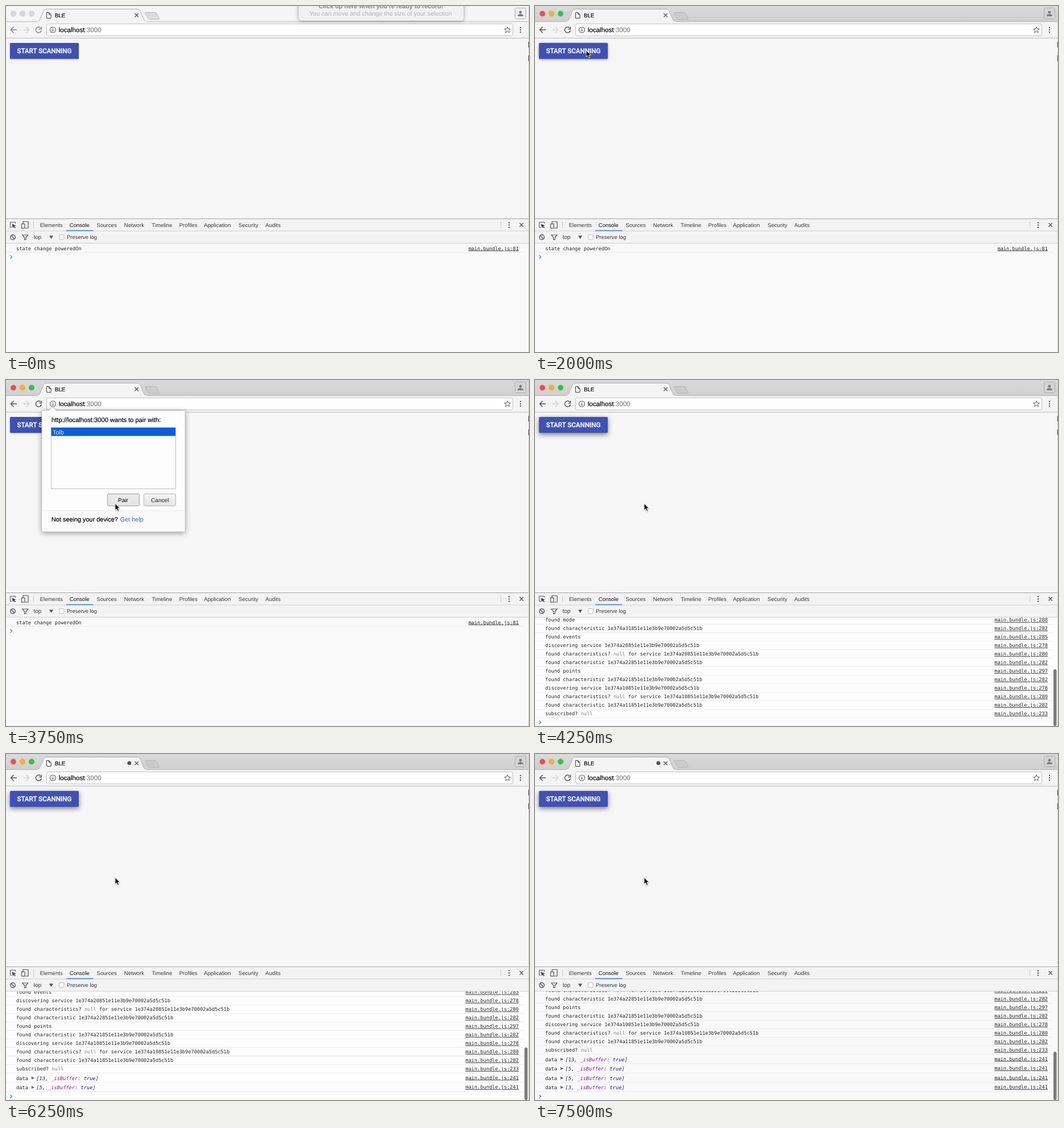
These frames come from a looping animation (920x609 px, 8 s). An HTML page:

```html
<!DOCTYPE html>
<html lang="en">
<head>
<meta charset="utf-8">
<title>BLE</title>
<style>
html, body { margin: 0; width: 100%; height: 100%; overflow: hidden; background: #f6f6f6; }
svg { display: block; width: 920px; height: 609px; }
text { font-family: "Liberation Sans", Arial, sans-serif; text-rendering: geometricPrecision; white-space: pre; }
.mono text { font-family: "DejaVu Sans Mono", monospace; font-size: 8.666px; fill: #262626; }
.line { fill: none; stroke: #5a5a5a; stroke-width: 1.4; }
.dark { stroke: #000; stroke-width: .2; }
.label { font-family: Roboto, sans-serif; font-weight: 500; stroke: #fff; stroke-width: .3; }
</style>
</head>
<body>
<svg id="stage" viewBox="0 0 920 609" xmlns="http://www.w3.org/2000/svg"></svg>
<script>
const LOOP = 8000, STEP = 250;

const rect = (x, y, w, h, fill, more = '') =>
  `<rect x="${x}" y="${y}" width="${w}" height="${h}" fill="${fill}" ${more}/>`;
const text = (x, y, size, str, fill = '#333', more = '') =>
  `<text x="${x}" y="${y}" font-size="${size}" fill="${fill}" ${more}>${str}</text>`;
const path = (d, more = 'class="line"') => `<path d="${d}" ${more}/>`;
const dot = (x, y, r, fill, more = '') => `<circle cx="${x}" cy="${y}" r="${r}" fill="${fill}" ${more}/>`;
const dots = (x, y, gap) => [-gap, 0, gap].map(d => dot(x, y + d, 1.2, '#5a5a5a')).join('');
const span = (str, fill) => `<tspan fill="${fill}" stroke="none">${str}</tspan>`;

function star(cx, cy, r) {
  const pts = [];
  for (let i = 0; i < 10; i++) {
    const a = i * Math.PI / 5 - Math.PI / 2, k = i % 2 ? r * 0.45 : r;
    pts.push((cx + k * Math.cos(a)).toFixed(1) + ',' + (cy + k * Math.sin(a)).toFixed(1));
  }
  return `<polygon points="${pts.join(' ')}" class="line" style="stroke-width:1"/>`;
}

function tabStrip() {
  return rect(0, 0, 920, 28, '#f5f5f5', 'id="strip"') +
    [13, 29, 45].map(x => dot(x, 13.5, 4.8, '#d8d8d8', 'class="light" stroke-width=".6"')).join('') +
    path('M0 27.5H920', 'stroke="#b4b4b4"') +
    path('M55 28C58 27 59 25 60.500 21.500L66 8.500Q67.500 5.500 70 5.500H232Q234.500 5.500 236 8.500L241.500 21.500C243 25 244 27 247 28Z',
      'fill="#f4f4f4" stroke="#adadad"') +
    path('M246 11.500H262Q264 11.500 265 13.500L269 21.500Q270 23.500 268 23.500H253Q251 23.500 250 21.500L245 13.500Q244 11.500 246 11.500Z',
      'id="newTab" fill="#dcdcdc" stroke="#b5b5b5"') +
    path('M71.500 11.500H75.500L79 15V21.500H71.500ZM75.500 11.500V15H79', 'fill="#fff" stroke="#333"') +
    text(86, 20, 9.7, 'BLE', '#000', 'class="dark"') +
    dot(217, 16, 3.5, '#555', 'id="badge"') +
    path('M226.500 13L233 19.500M233 13L226.500 19.500') +
    rect(895.5, 3.5, 19, 19, '#e6e6e6', 'id="profile" rx="2" stroke="#acacac"') +
    dot(905, 11, 2.4, '#777') + path('M900 18Q900 14.300 905 14.300T910 18Z', 'fill="#777"');
}

function toolbar() {
  return rect(0, 28, 920, 28, '#f4f4f4') + rect(55, 27, 192, 2, '#f4f4f4') +
    path('M0 56.500H920', 'stroke="#b9b9b9"') +
    `<g id="nav" fill="none" stroke-width="1.400">` +
    path('M19 42H8.500M13.500 36.800L8.300 42L13.500 47.200', '') +
    path('M61 38.500A5 5 0 1 0 62.300 43M62.500 36.500V40.500H58.500', '') + `</g>` +
    path('M30 42H40.500M35.500 36.800L40.700 42L35.500 47.200', 'fill="none" stroke="#d2d2d2" stroke-width="1.4"') +
    rect(71.5, 31.5, 820, 21, '#fff', 'rx="2.5" stroke="#c1c1c1"') +
    dot(82.500, 42, 5, 'none', 'class="line" style="stroke-width:1.1"') +
    path('M82.500 41V45M82.500 38.700V40', 'stroke="#444" stroke-width="1.3"') +
    text(92.700, 45.700, 11.63, 'localhost' + span(':3000', '#6e6e6e'), '#000', 'class="dark"') +
    star(882, 42.300, 5.6) + dots(905, 42, 4);
}

function devtools() {
  const tabs = [['Elements', 59.7], ['Console', 111.700], ['Sources', 159.500], ['Network', 207.700],
    ['Timeline', 256.300], ['Profiles', 304.700], ['Application', 348.300], ['Security', 409], ['Audits', 456.300]];
  return rect(0, 375, 920, 42, '#f3f3f3') +
    path('M0 374.500H920', 'stroke="#a3a3a3"') + path('M0 396H920M0 417.500H920', 'stroke="#cfcfcf"') +
    path('M48.500 379V391.500M870.500 379V391.500', 'stroke="#ccc"') +
    tabs.map(([s, x]) => text(x, 388.500, 9.62, s, s === 'Console' ? '#111' : '#3a3a3a')).join('') +
    rect(106, 394.500, 47.500, 1.700, '#4a8af0') +
    path('M10 389.500H7.500V380.500H16.500V383', 'fill="none" stroke="#555"') +
    path('M10.500 383.500L17.500 386.500L14.800 387.500L17 390.200L15.800 391.300L13.500 388.500L12 391Z', 'fill="#444"') +
    path('M30 383V379.500H39V391H34', 'fill="none" stroke="#555" stroke-width="1.200"') +
    rect(27.5, 383.5, 5.500, 7.500, '#f3f3f3', 'stroke="#555" stroke-width="1.200"') +
    dots(885, 385.500, 4) + path('M903.500 382L910 388.500M910 382L903.500 388.500') +
    dot(12, 407, 4.3, 'none', 'class="line"') + path('M9 404L15 410') +
    path('M28.800 403H38.800L35 407.500V411.500H32.600V407.500Z', 'class="line" style="stroke-width:1.200"') +
    text(48.500, 410, 10, 'top', '#3a3a3a') + path('M76 404.300H83L79.500 410Z', 'fill="#555"') +
    rect(93.5, 402.5, 8.500, 8.500, '#fff', 'rx="1.500" stroke="#b5b5b5"') +
    text(107, 410, 9.450, 'Preserve log', '#3a3a3a');
}

function dialog() {
  const button = (x, w, label, tx, id) =>
    rect(x, 200.5, w, 21, 'url(#btn)', `id="${id}" rx="2" stroke="#b3b3b3"`) +
    text(tx, 214.500, 10.100, label, '#222', `id="${id}Text"`);
  return `<g id="dialog">` +
    path('M65 53.500H76L82 47.500L88 53.500H313Q315 53.500 315 55.500V265Q315 267 313 267H65Q63 267 63 265V55.500Q63 53.500 65 53.500Z',
      'fill="#fdfdfd" stroke="#b8b8b8" stroke-width=".7" style="filter:drop-shadow(0 2px 5px rgba(0,0,0,.38))"') +
    rect(63.5, 230, 251, 36.500, '#fafafa', 'rx="1.500"') + path('M63.500 230H314.500', 'stroke="#e8e8e8"') +
    text(80, 73.500, 11.170, 'http://localhost:3000 wants to pair with:', '#000', 'class="dark"') +
    rect(79.5, 83.5, 219, 108, '#fdfdfd', 'stroke="#bdbdbd"') +
    `<g id="device">${rect(79.500, 84, 218.500, 14.500, '#0b5cdb', 'id="pick"')}${text(82, 96, 11, 'Tolb', '#fff', 'id="deviceText"')}</g>` +
    button(178.5, 56, 'Pair', 197, 'pair') + button(242.5, 56, 'Cancel', 255, 'cancel') +
    text(80, 249, 10.900, 'Not seeing your device?', '#000', 'class="dark"') +
    text(200.800, 249, 10.850, 'Get help', '#2f66dc') + `</g>`;
}

function banner() {
  return `<g id="banner">` +
    rect(515, -40, 290, 65.500, '#f1f1f1', 'rx="5" stroke="#d9d9d9" stroke-width=".6" style="filter:drop-shadow(0 1px 3px rgba(0,0,0,.35))"') +
    text(659.500, 3.500, 10.820, 'Click up here when you\'re ready to record!', '#858585', 'font-weight="700" text-anchor="middle"') +
    text(659, 17, 10.870, 'You can move and change the size of your selection', '#b2b2b2', 'text-anchor="middle"') + `</g>`;
}

document.getElementById('stage').innerHTML = `<defs>
  <linearGradient id="bar" x2="0" y2="1"><stop stop-color="#dadada"/><stop offset="1" stop-color="#cfcfcf"/></linearGradient>
  <linearGradient id="btn" x2="0" y2="1"><stop stop-color="#f5f5f5"/><stop offset="1" stop-color="#e4e4e4"/></linearGradient>
  <linearGradient id="btnHot" x2="0" y2="1"><stop stop-color="#eaeaea"/><stop offset="1" stop-color="#e6e6e6"/></linearGradient>
  <clipPath id="view"><rect x="0" y="418" width="920" height="191"/></clipPath></defs>` +
  rect(0, 0, 920, 609, '#f6f6f6') + tabStrip() + toolbar() +
  rect(7, 65, 121, 28, '#3f51b5', 'id="scan" rx="1.500"') +
  text(19.500, 83, 11.600, 'START SCANNING', '#fff', 'class="label"') +
  devtools() + rect(0, 418, 920, 191, '#f9f9f9', 'id="pane"') +
  `<g id="log" class="mono" clip-path="url(#view)"></g>` +
  path('M0 -2.800L3 0L0 2.800', 'id="prompt" fill="none" stroke="#3d7fe8" stroke-width="1.300"') +
  rect(912, 509, 5.500, 100, '#7c7c7c', 'id="thumb" rx="2.750"') +
  path('M919.500 0V609', 'stroke="#cfcfcf"') + path('M919.500 63V73M919.500 87V97', 'stroke="#333"') +
  dialog() + banner() +
  path('M0 0V11.600L2.700 9.100L4.700 13.500L6.700 12.600L4.800 8.400H8.400Z',
    'id="cursor" fill="#000" stroke="#fff" stroke-width=".9" style="filter:drop-shadow(0 1px 1px rgba(0,0,0,.3))"');

const el = id => document.getElementById(id);
const show = (id, on) => el(id).setAttribute('display', on ? 'inline' : 'none');
const set = (id, key, val) => el(id).setAttribute(key, val);

const uuid = n => `1e374a${n}851e11e3b9e70002a5d5c51b`;
const nul = span('null', '#808080');
const char = n => [`found characteristic ${uuid(n)}`, 282];
const service = n => [`discovering service ${uuid(n)}`, 278];
const chars = n => [`found characteristics? ${nul} for service ${uuid(n)}`, 280];
const LOG = [['found mode', 288], char(31), ['found events', 285], service(20), chars(20), char(22),
  ['found points', 297], char(21), service(10), chars(10), char(11), [`subscribed? ${nul}`, 233]];
const DATA = [13, 5, 5, 3];

const link = (y, n) => `<text x="902" y="${y}" text-anchor="end" text-decoration="underline">main.bundle.js:${n}</text>`;
const rule = y => path(`M0 ${y}H912`, 'stroke="#ececec"');

function dataRow(y, n) {
  return `<text x="18" y="${y}">data</text>` + path(`M44.800 ${y - 6.300}L50.300 ${y - 3.500}L44.800 ${y - .7}Z`, 'fill="#6e6e6e"') +
    `<text x="53.300" y="${y}" font-style="italic">[${span(n, '#1c00cf')}, ${span('_isBuffer', '#881391')}: ${span('true', '#1c00cf')}]</text>` +
    link(y - 1.200, 241);
}

// Rows stack upwards from the prompt at the bottom of the pane.
function fullLog(count) {
  let bottom = 594.500, out = '';
  for (let i = count - 1; i >= 0; i--) {
    out += rule(bottom) + dataRow(bottom - 4.300, DATA[i]);
    bottom -= 16.500;
  }
  for (let i = LOG.length - 1; i >= 0; i--) {
    const y = bottom - 4.500;
    out += rule(bottom) + `<text x="18" y="${y}">${LOG[i][0]}</text>` + link(y, LOG[i][1]);
    bottom -= 14.970;
  }
  return out;
}
const firstLog = rule(433.500) + '<text x="18" y="429.500">state change poweredOn</text>' + link(429.500, 81);

const MOVES = [[250, 640, 20], [1250, 130, 124], [1500, 130, 124], [2000, 90, 78], [2750, 90, 78],
  [3250, 112, 90], [3500, 112, 90], [3750, 192, 217.500], [LOOP, 192, 217.500]];
function cursorAt(t) {
  let i = 0;
  while (i < MOVES.length - 2 && t >= MOVES[i + 1][0]) i++;
  const [t0, x0, y0] = MOVES[i], [t1, x1, y1] = MOVES[i + 1];
  const u = Math.max(0, Math.min(1, (t - t0) / (t1 - t0))), k = u * u * (3 - 2 * u);
  return [x0 + (x1 - x0) * k, y0 + (y1 - y0) * k];
}

const LIGHTS = ['#fb4948', '#fdb124', '#27c93f'];
function draw(t) {
  const active = t >= 750;
  set('strip', 'fill', active ? 'url(#bar)' : '#f5f5f5');
  set('newTab', 'fill', active ? '#cbcbcb' : '#dcdcdc');
  set('profile', 'fill', active ? '#d4d4d4' : '#f0f0f0');
  set('nav', 'stroke', active ? '#505050' : '#808080');
  document.querySelectorAll('.light').forEach((c, i) => {
    c.setAttribute('fill', active ? LIGHTS[i] : '#d8d8d8');
    c.setAttribute('stroke', active ? 'rgba(0,0,0,.15)' : '#c6c6c6');
  });

  show('banner', t < 500);
  set('banner', 'transform', `translate(0 ${t < 250 ? 0 : -16})`);
  set('banner', 'opacity', t < 250 ? 1 : 0.5);
  show('badge', t >= 4500);

  const raised = t >= 4000, hover = t >= 2000 && t < 2500;
  const lift = raised ? '0 3px 4px rgba(0,0,0,.5)' : hover ? '0 1px 2px rgba(0,0,0,.45)' : '0 1px 1px rgba(0,0,0,.3)';
  el('scan').style.filter = `drop-shadow(${lift})`;

  const picked = t >= 3500;
  show('dialog', t >= 2500 && t < 4000);
  show('device', t >= 2750);
  show('pick', picked);
  set('deviceText', 'fill', picked ? '#dfeaff' : '#222');
  set('pair', 'fill', t >= 3750 ? 'url(#btnHot)' : 'url(#btn)');
  set('pair', 'stroke', t >= 3750 ? '#9a9a9a' : '#b3b3b3');
  set('pairText', 'fill', picked ? '#000' : '#aaa');

  const logged = t >= 4250;
  const count = t >= 7500 ? 4 : t >= 6250 ? 2 : t >= 5500 ? 1 : 0;
  el('log').innerHTML = logged ? fullLog(count) : firstLog;
  set('pane', 'fill', logged && t < 7500 ? '#fdfdfd' : '#f9f9f9');
  set('prompt', 'transform', `translate(7.500 ${logged ? 602.500 : 441.800})`);

  const top = 509 + count * 3.750;
  show('thumb', logged && (t < 5000 || t >= 5750 && t < 7000 || t >= 7500));
  set('thumb', 'y', top);
  set('thumb', 'height', 609 - top);

  show('cursor', t >= 250);
  set('cursor', 'transform', `translate(${cursorAt(t).join(' ')})`);
}

let last = -1;
const start = performance.now();
function tick() {
  const t = Math.floor(((performance.now() - start) % LOOP) / STEP) * STEP;
  if (t !== last) draw(last = t);
  requestAnimationFrame(tick);
}
tick();
</script>
</body>
</html>
```
